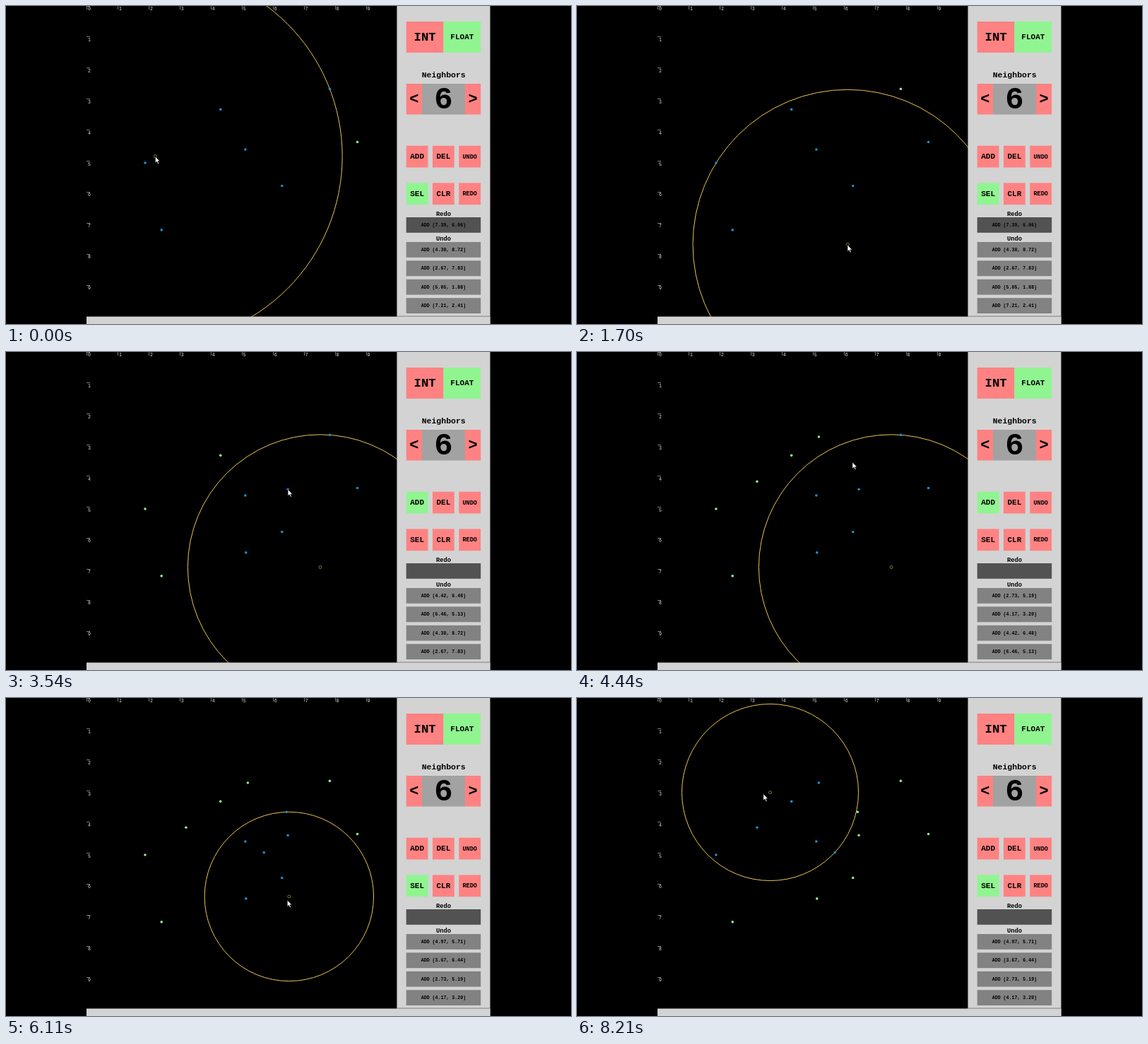
An HTML page with a canvas that plays this animation: 800 px wide and 450 px high, repeating every 8.25 s.

```html
<!DOCTYPE html>
<html lang="en">
<head>
<meta charset="utf-8">
<title>Nearest neighbors</title>
<style>
html, body { margin: 0; width: 100%; height: 100%; overflow: hidden; background: #000; }
canvas { display: block; width: 800px; height: 450px; }
</style>
</head>
<body>
<canvas id="stage" width="800" height="450"></canvas>
<script>
const ctx = document.getElementById('stage').getContext('2d');
const LOOP = 8250, LEFT = 114, UNIT = 43.95, K = 6;
const MONO = '"Liberation Mono", "Courier New", monospace';
const COLOR = { panel: '#d3d3d3', off: '#ff8282', on: '#90f590', grey: '#a2a2a2',
  item: '#828282', redo: '#525252', ring: '#e6c552', near: '#1a90d2', far: '#90ee90' };

// The first points are there from the start, the rest are added one by one.
const OLD = 7, FIRST_ADD = 3180, ADD_STEP = 340;
const points = [
  [3.33, 4.31], [4.62, 5.11], [5.79, 6.29],
  [7.21, 2.41], [5.05, 1.88], [2.67, 7.83], [4.38, 8.72],
  [6.46, 5.13], [4.42, 6.48], [4.17, 3.20], [2.73, 5.19], [3.67, 6.44], [4.97, 5.71]
].map(([row, col], i) => ({
  row, col, x: LEFT + 0.3 + col * UNIT, y: row * UNIT,
  at: i < OLD ? 0 : FIRST_ADD + (i - OLD) * ADD_STEP
}));

const UNDONE = 'ADD (7.39, 6.06)';
const ADD_AT = 2890, SEL_AT = 5440;
const DRAG_END = 2480, DRAG_START = 5940, LAG = 33;
const PICK = [445, 304.5];

// Mouse path as [time, x, y]; a hold keeps still around a moment.
const hold = (t, x, y, half = 40) => [[t - half, x, y], [t + half, x, y]];
const path = [
  [0, 211.3, 212.7], [420, 292, 186],
  ...hold(925, 411, 245), [1700, 383, 338], [2200, 441, 320], [2300, 449, 298],
  ...hold(2515, ...PICK, 85),
  ...hold(ADD_AT, 582, 215),
  ...points.slice(OLD).flatMap(p => hold(p.at, p.x, p.y)),
  [5080, 365, 218.5], [5210, 586, 194],
  ...hold(SEL_AT, 582, 266),
  [DRAG_START, 416, 268], [6260, 385, 300], [6940, 287, 212],
  [7250, 250, 150], [7560, 300, 92], [7860, 372, 112], [8177, 273.5, 133.5], [LOOP, 257, 137]
];

function slope(i, axis) {
  if (i <= 0 || i >= path.length - 1) return 0;
  const rate = j => (path[j + 1][axis] - path[j][axis]) / (path[j + 1][0] - path[j][0]);
  const a = rate(i - 1), b = rate(i);
  return a * b > 0 ? 2 * a * b / (a + b) : 0;
}

// Monotone cubic through the path
function mouseAt(t) {
  if (t <= 0) return path[0].slice(1);
  let i = 0;
  while (path[i + 1][0] <= t) i++;
  const span = path[i + 1][0] - path[i][0], u = (t - path[i][0]) / span;
  const s = u * u * (3 - 2 * u);
  return [1, 2].map(axis =>
    path[i][axis] * (1 - s) + path[i + 1][axis] * s +
    span * u * (1 - u) * ((1 - u) * slope(i, axis) - u * slope(i + 1, axis)));
}

function queryAt(t) {
  if (t >= DRAG_END && t < DRAG_START) return PICK;
  return mouseAt(t >= DRAG_START ? Math.max(t - LAG, DRAG_START) : t - LAG);
}

function box(x, y, w, h, color) {
  ctx.fillStyle = color;
  ctx.fillRect(x, y, w, h);
}

function label(text, x, y, size, color = '#000', weight = 'bold') {
  ctx.font = `${weight} ${size}px ${MONO}`;
  ctx.fillStyle = color;
  ctx.fillText(text, x, y);
}

function button(text, x, y, w, h, size, color) {
  box(x, y, w, h, color);
  label(text, x + w / 2, y + h / 2 + size * 0.045, size);
}

function circle(x, y, r) {
  ctx.beginPath();
  ctx.arc(x, y, r, 0, Math.PI * 2);
}

function drawAxes() {
  for (let i = 0; i < 10; i++) {
    const p = i * UNIT;
    box(Math.round(LEFT + p), 0, 1, 5, '#777');
    box(LEFT, Math.max(0, Math.round(p) - 1), 5, 1, '#777');
    label(i, LEFT + p + 4, 3.8, 6.6, '#ddd', 'normal');
    if (i) label(i, LEFT + 4, p + 4, 6.6, '#ddd', 'normal');
  }
}

function drawPlot(t, shown) {
  const [qx, qy] = queryAt(t);
  const dist = p => Math.hypot(p.x - qx, p.y - qy);
  const sorted = [...shown].sort((a, b) => dist(a) - dist(b));
  ctx.save();
  ctx.beginPath();
  ctx.rect(LEFT, 0, 440, 440);
  ctx.clip();
  drawAxes();
  ctx.lineWidth = 1;
  ctx.strokeStyle = COLOR.ring;
  circle(qx, qy, dist(sorted[K - 1]));
  ctx.stroke();
  sorted.forEach((p, i) => {
    ctx.fillStyle = i < K ? COLOR.near : COLOR.far;
    circle(p.x, p.y, 1.8);
    ctx.fill();
  });
  ctx.lineWidth = 0.8;
  ctx.strokeStyle = '#a0913c';
  circle(qx, qy, 2);
  ctx.stroke();
  ctx.restore();
}

function drawPanel(t, shown) {
  const { on, off } = COLOR;
  const mode = t >= ADD_AT && t < SEL_AT ? 'ADD' : 'SEL';
  box(LEFT, 439.5, 571.5, 10.5, COLOR.panel);
  box(553.5, 0, 132, 450, COLOR.panel);
  box(553.5, 438.6, 132, 0.9, '#777');

  button('INT', 566.7, 22, 52.8, 44, 17.4, off);
  button('FLOAT', 619.5, 22, 52.7, 44, 11, on);
  label('Neighbors', 619.7, 98.5, 11.5);
  button('<', 566.7, 110, 22.3, 43.5, 22, off);
  button(K, 589, 110, 61, 43.5, 44, COLOR.grey);
  button('>', 650, 110, 22.2, 43.5, 22, off);

  [['ADD', 'DEL', 'UNDO'], ['SEL', 'CLR', 'REDO']].forEach((row, r) =>
    row.forEach((name, c) =>
      button(name, 566.7 + c * 37.3, 197.7 + r * 52.7, 30.8, 30.8,
        c < 2 ? 11 : 8.6, name === mode ? on : off)));

  const item = (text, y, color) => button(text, 566.7, y, 105.5, 21.8, 6.6, color);
  label('Redo', 619.5, 294.8, 8.8);
  item(t < FIRST_ADD ? UNDONE : '', 299, COLOR.redo);
  label('Undo', 619.5, 329.8, 8.8);
  shown.slice(-4).reverse().forEach((p, i) =>
    item(`ADD (${p.row.toFixed(2)}, ${p.col.toFixed(2)})`, 334 + i * 26.4, COLOR.item));
}

function drawCursor([x, y]) {
  ctx.beginPath();
  ctx.moveTo(x, y);
  [[0, 9.4], [2.2, 7.5], [3.8, 11], [5.3, 10.3], [3.8, 7], [6.6, 7]]
    .forEach(([dx, dy]) => ctx.lineTo(x + dx, y + dy));
  ctx.closePath();
  ctx.fillStyle = '#fff';
  ctx.fill();
  ctx.lineWidth = 0.7;
  ctx.strokeStyle = '#000';
  ctx.stroke();
}

function draw(t) {
  const shown = points.filter(p => p.at <= t);
  box(0, 0, 800, 450, '#000');
  ctx.textAlign = 'center';
  ctx.textBaseline = 'middle';
  drawPlot(t, shown);
  drawPanel(t, shown);
  drawCursor(mouseAt(t));
}

let start;
function tick(now) {
  if (start === undefined) start = now;
  draw((now - start) % LOOP);
  requestAnimationFrame(tick);
}
draw(0);
requestAnimationFrame(tick);
</script>
</body>
</html>
```
